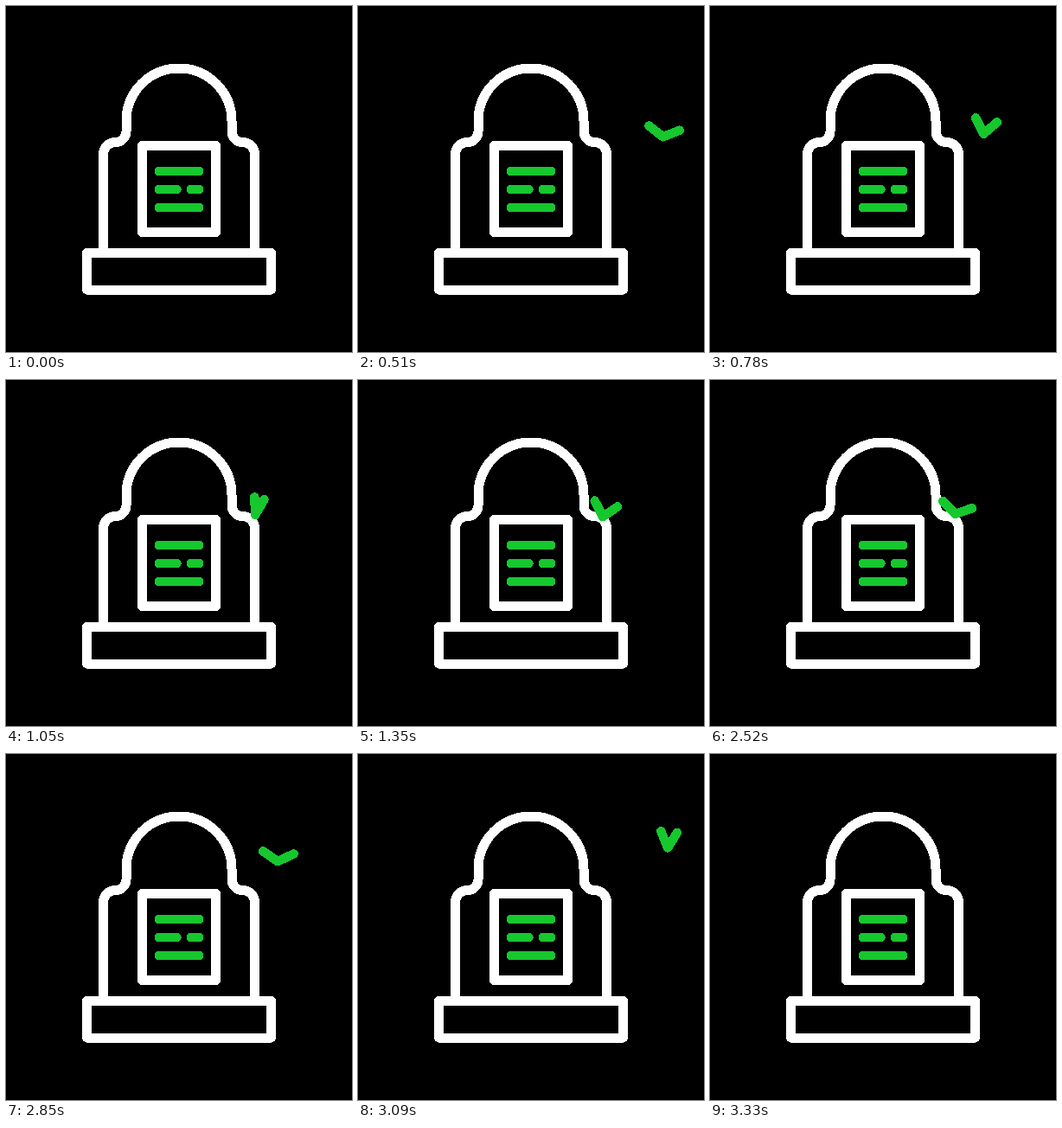
These frames come from a looping animation (400 by 400 pixels, 3.63 s). An HTML page:

```html
<!DOCTYPE html>
<html lang="en">
<head>
<meta charset="utf-8">
<title>Tombstone and bird</title>
<style>
  html, body { margin: 0; width: 100%; height: 100%; overflow: hidden; background: #000; }
  svg { display: block; width: 100vw; height: 100vh; shape-rendering: crispEdges; }
  path, rect { fill: none; stroke-linecap: round; stroke-linejoin: round; }
  .stone { stroke: #fff; stroke-width: 11; }
  .green { stroke: #16c72e; stroke-width: 10.5; }
</style>
</head>
<body>
<svg viewBox="0 0 400 400">
  <g class="stone">
    <path d="M112.500 285V171.500a14 14 0 0 1 14-14a12.500 12.500 0 0 0 12.500-12.500V133a61 61 0 0 1 122 0v12a12.500 12.500 0 0 0 12.500 12.500a14 14 0 0 1 14 14V285"/>
    <rect x="93.500" y="285.500" width="213" height="42.500"/>
    <rect x="157.500" y="161.500" width="85" height="100"/>
  </g>
  <path class="green" d="M177 191H223M177 212H197.500M214 212H223M177 233H223"/>
  <path class="green" id="bird"/>
</svg>
<script>
const LOOP = 3630, STEP = 30, WING = 20.6;
const LAND = 1110, LEAVE = 2490, MIDDLE = 1860;
const FLAP = 360, OPEN = 60, FOLDED = 16, REST = 26.5;
const PERCH = { x: 283, y: 158, lean: 14.5 };
const bird = document.getElementById('bird');

// d counts the ms until landing.
const arrive = d => ({
  x: PERCH.x + 0.083 * d + 0.000055 * d * d,
  y: PERCH.y - 11 * Math.sin(Math.PI * (0.083 * d + 0.000055 * d * d) / 88),
  lean: PERCH.lean - 0.01 * d
});

// d counts the ms since take-off.
const depart = d => ({
  x: PERCH.x + 31 * (d / 360) ** 1.73,
  y: PERCH.y - 56.5 * Math.sin(Math.PI / 2 * d / 880),
  lean: Math.max(5, PERCH.lean - 0.026 * d)
});

function body(t) {
  if (t < LAND) return arrive(LAND - t);
  return t > LEAVE ? depart(t - LEAVE) : PERCH;
}

// Half the angle between the wings; landing and take-off mirror each other.
function spread(t) {
  const u = Math.abs(t - MIDDLE) - (LEAVE - MIDDLE);
  if (u > 0) {
    const mid = (OPEN + FOLDED) / 2;
    return mid + (OPEN - mid) * Math.cos(2 * Math.PI * u / FLAP);
  }
  const p = Math.min(1, -u / FLAP);
  return REST + (OPEN - REST) * (1 - p) ** 2;
}

function draw(now) {
  const t = Math.floor((now % LOOP) / STEP) * STEP;
  const { x, y, lean } = body(t), half = spread(t);
  const tip = deg => {
    const a = deg * Math.PI / 180;
    return `${(x + WING * Math.sin(a)).toFixed(2)} ${(y - WING * Math.cos(a)).toFixed(2)}`;
  };
  bird.setAttribute('d', `M${tip(lean - half)}L${x.toFixed(2)} ${y.toFixed(2)}L${tip(lean + half)}`);
}

let start;
function tick(now) {
  start ??= now;
  draw(now - start);
  requestAnimationFrame(tick);
}
draw(0);
requestAnimationFrame(tick);
</script>
</body>
</html>
```
